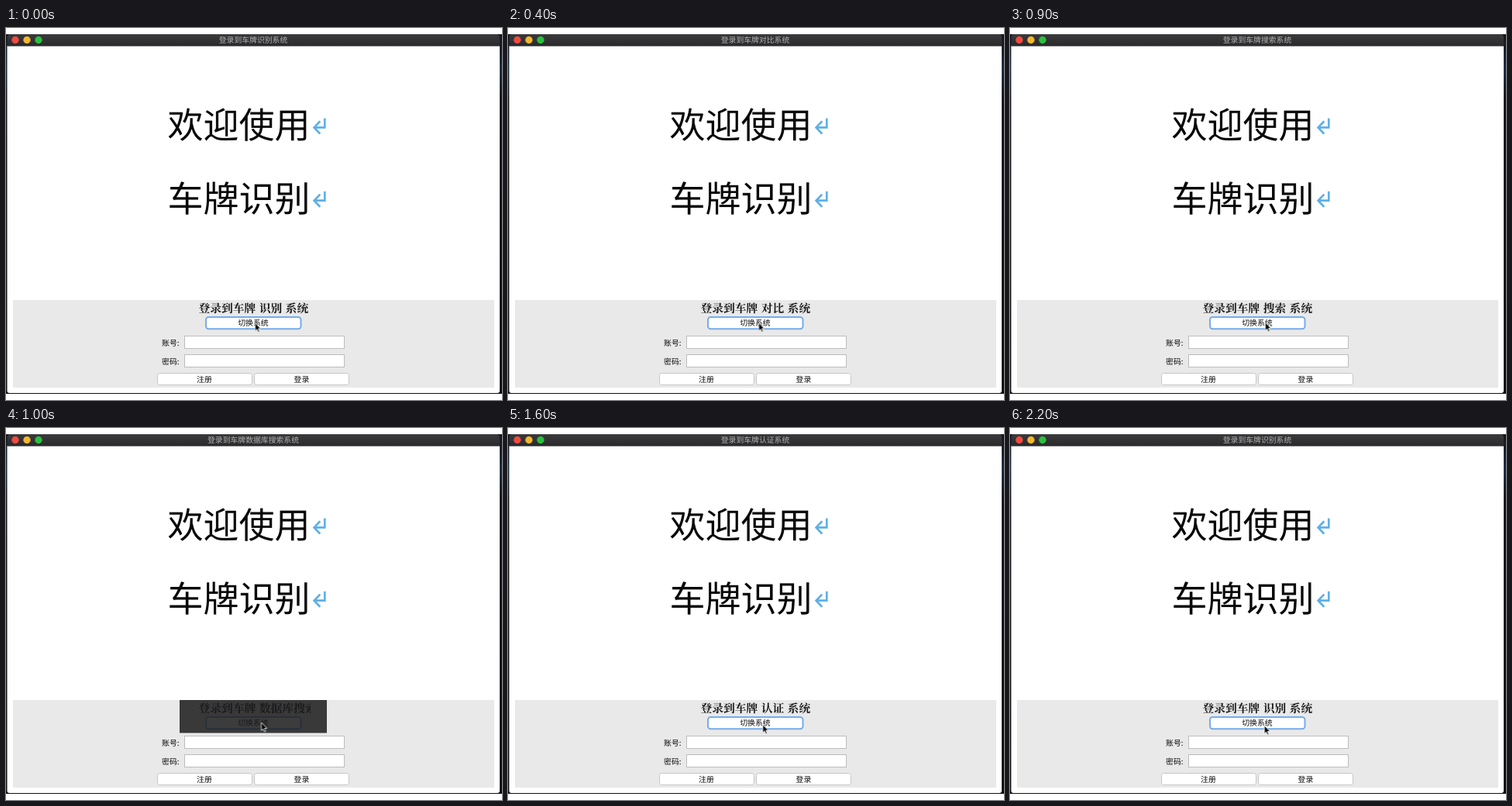
Recreate the animation shown at these times as an HTML page. Size 640 px wide and 480 px high, loop 2.3 s.

```html
<!DOCTYPE html>
<html lang="zh-CN">
<head>
<meta charset="utf-8">
<title>登录</title>
<style>
  html, body { margin: 0; width: 100%; height: 100%; overflow: hidden; background: #fff; }
  svg { display: block; width: 640px; height: 480px; }
  text { font-family: "Noto Sans CJK SC", "Noto Sans CJK", sans-serif; text-rendering: geometricPrecision; }
  .welcome { font-size: 46px; fill: #080808; }
  .return { fill: none; stroke: #5fb0e6; stroke-width: 2.7; }
  .title { font-size: 9.83px; fill: #b2b2b2; text-anchor: middle; }
  .heading {
    font: 600 14.8px "Noto Serif CJK SC", "Songti SC", "Noto Sans CJK SC", "Noto Sans CJK", serif;
    word-spacing: .6px; fill: #1a1a1a; text-anchor: middle;
  }
  .early { text-anchor: start; }
  .ui { font-size: 9.9px; font-weight: 500; fill: #080808; }
  .mid { text-anchor: middle; }
  .field { fill: #fff; stroke: #bdbdbd; }
  .button { fill: #fff; stroke: #c6c6c6; }
  .focus { fill: #fff; stroke: #77ace8; stroke-width: 2; }

  /* One loop is 2300 ms; each state switches without a blend. */
  .state { visibility: hidden; animation: 2300ms step-end infinite; }
  .recognise { animation-name: recognise; }
  .compare { animation-name: compare; }
  .search { animation-name: search; }
  .database { animation-name: database; }
  .resize { animation-name: resize; }
  .settled { animation-name: settled; }
  .verify { animation-name: verify; }
  @keyframes recognise { 0%, 86.95% { visibility: visible } 8.69%, 100% { visibility: hidden } }
  @keyframes compare { 0%, 26.08% { visibility: hidden } 8.69% { visibility: visible } }
  @keyframes search { 0%, 43.47% { visibility: hidden } 26.08% { visibility: visible } }
  @keyframes database { 0%, 65.21% { visibility: hidden } 43.47% { visibility: visible } }
  @keyframes resize { 0%, 47.82% { visibility: hidden } 43.47% { visibility: visible } }
  @keyframes settled { 0%, 65.21% { visibility: hidden } 47.82% { visibility: visible } }
  @keyframes verify { 0%, 86.95% { visibility: hidden } 65.21% { visibility: visible } }

  .cursor { animation: point 2300ms linear infinite; }
  @keyframes point {
    0%, 15.2% { transform: translate(321.5px, 380.5px) }
    24%, 61% { transform: translate(329.5px, 380px) }
    74%, 100% { transform: translate(328.3px, 384px) }
  }
</style>
</head>
<body>
<svg viewBox="0 0 640 480">
  <defs>
    <linearGradient id="bar" x2="0" y2="1">
      <stop stop-color="#3b3b3d"/><stop offset="1" stop-color="#29292b"/>
    </linearGradient>
    <linearGradient id="desk" x2="0" y2="1">
      <stop stop-color="#15161a"/><stop offset=".1" stop-color="#1c2c44"/>
      <stop offset=".18" stop-color="#17181c"/><stop offset="1" stop-color="#111"/>
    </linearGradient>
    <clipPath id="cut"><rect x="224" y="351" width="169" height="42"/></clipPath>
    <path id="enter" class="return" d="M411.3 116.5V128.4H398.5M405.3 120.3L397.6 128.4L405.3 136.5"/>
  </defs>

  <!-- Desktop edges and window -->
  <rect y="8" width="640" height="464" fill="url(#desk)"/>
  <path d="M1.5 23H637V468Q637 471 634 471H4.5Q1.5 471 1.5 468Z" fill="#fff"/>
  <path d="M1.5 23.5V12Q1.5 8 5.5 8H633Q637 8 637 12V23.5Z" fill="url(#bar)"/>
  <circle cx="12" cy="15.5" r="4.7" fill="#f04a43"/>
  <circle cx="27" cy="15.5" r="4.7" fill="#f5b52e"/>
  <circle cx="42" cy="15.5" r="4.7" fill="#2bbf3c"/>

  <text class="welcome" x="208.5" y="142.3">欢迎使用</text>
  <text class="welcome" x="208.5" y="236.5">车牌识别</text>
  <use href="#enter"/>
  <use href="#enter" y="94.3"/>

  <!-- Login panel -->
  <rect x="9" y="351" width="621" height="113" fill="#e9e9e9"/>
  <rect class="focus" x="258" y="373" width="122.5" height="15.3" rx="3.5"/>
  <text class="ui mid" x="319" y="384.4">切换系统</text>
  <text class="ui" x="201" y="409.6">账号:</text>
  <text class="ui" x="201" y="433.6">密码:</text>
  <rect class="field" x="230.5" y="397.5" width="206" height="16"/>
  <rect class="field" x="230.5" y="421.5" width="206" height="16"/>
  <rect class="button" x="195.5" y="445.5" width="122" height="15" rx="3"/>
  <rect class="button" x="320.5" y="445.5" width="122" height="15" rx="3"/>
  <text class="ui mid" x="256" y="456.8">注册</text>
  <text class="ui mid" x="381.5" y="456.8">登录</text>

  <!-- Changing captions -->
  <g class="state recognise">
    <text class="title" x="319" y="19.3">登录到车牌识别系统</text>
    <text class="heading" x="319.3" y="367.4">登录到车牌 识别 系统</text>
  </g>
  <g class="state compare">
    <text class="title" x="319" y="19.3">登录到车牌对比系统</text>
    <text class="heading" x="319.3" y="367.4">登录到车牌 对比 系统</text>
  </g>
  <g class="state search">
    <text class="title" x="319" y="19.3">登录到车牌搜索系统</text>
    <text class="heading" x="319.3" y="367.4">登录到车牌 搜索 系统</text>
  </g>
  <text class="title state database" x="319" y="19.3">登录到车牌数据库搜索系统</text>
  <g class="state resize">
    <g clip-path="url(#cut)">
      <text class="heading early" x="248.5" y="367.4">登录到车牌 数据库搜索 系统</text>
    </g>
    <rect x="224" y="351" width="190" height="42.5" fill="#1a1a1a" fill-opacity=".85"/>
  </g>
  <text class="heading state settled" x="319.3" y="367.4">登录到车牌 数据库搜索 系统</text>
  <g class="state verify">
    <text class="title" x="319" y="19.3">登录到车牌认证系统</text>
    <text class="heading" x="319.3" y="367.4">登录到车牌 认证 系统</text>
  </g>

  <path class="cursor" d="M0 0V10.4L2.3 8.3L3.9 12L5.6 11.3L4 7.6H7.2Z" fill="#000" stroke="#fff" stroke-width=".8"/>
</svg>
</body>
</html>
```
